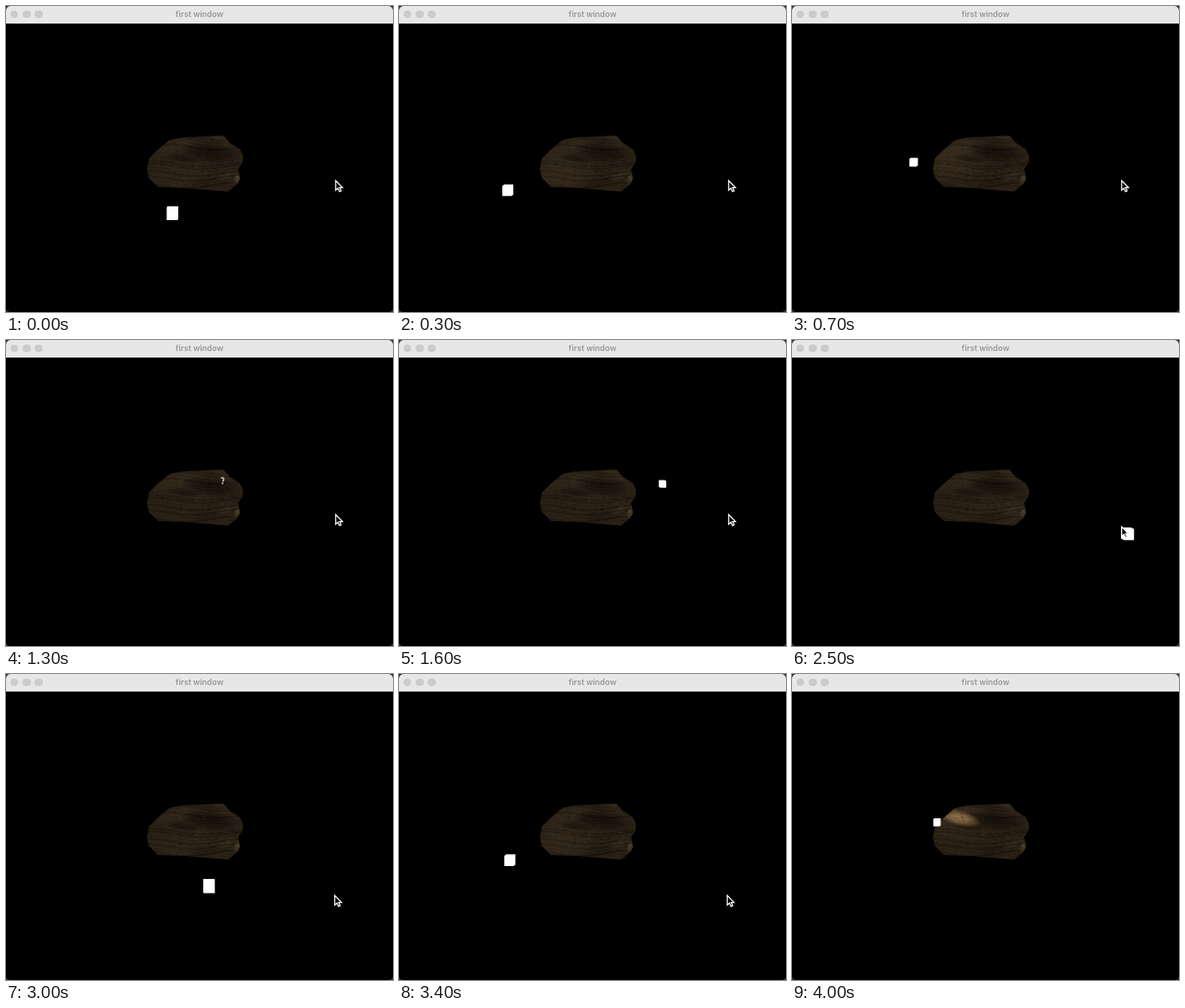
Write an HTML page with a canvas that moves like this. It is 420 by 333 pixels and loops after 4.1 s.

```html
<!DOCTYPE html>
<html lang="en">
<head>
<meta charset="utf-8">
<title>first window</title>
<style>
  html, body { margin: 0; width: 100%; height: 100%; overflow: hidden; background: #333; }
  .window { position: absolute; left: 0; top: 0; width: 420px; height: 333px; overflow: hidden; background: #000; border-radius: 5px; }
  .bar { position: absolute; left: 0; top: 0; width: 420px; height: 20px; background: #e7e7e7; border-bottom: 1px solid #1c2420; box-sizing: border-box; }
  .bar i { position: absolute; top: 4.7px; left: 4.8px; width: 8.6px; height: 8.6px; border-radius: 50%; background: #cbcbcb; }
  .bar i + i { left: 18px; }
  .bar i + i + i { left: 31.3px; }
  .bar span { position: absolute; left: 0; width: 420px; top: 0; text-align: center; font: 600 8.7px/18px Inter, sans-serif; color: #989898; }
  canvas { position: absolute; left: 0; top: 0; }
</style>
</head>
<body>
<div class="window">
  <canvas id="view" width="420" height="333"></canvas>
  <div class="bar"><i></i><i></i><i></i><span>first window</span></div>
</div>
<script>
const LOOP = 4.1, STEP = 0.1;
const ctx = document.getElementById('view').getContext('2d');
const { sin, cos, exp, abs, PI } = Math;
const rad = d => d * PI / 180;
const shape = s => new Path2D('M' + s + 'Z');
const brown = (v, alpha = 1) => `rgba(${v},${v * .78},${v * .53},${alpha})`;

function smooth(a, b, t) {
  const k = Math.min(1, Math.max(0, (t - a) / (b - a)));
  return k * k * (3 - 2 * k);
}

let seed = 7;
const rnd = () => (seed = seed * 16807 % 2147483647) / 2147483647;

// light angle in degrees: 0 = nearest the viewer, 90 = left, 180 = far side
const lightAngle = t => 24 + 116.5 * t + 3 * sin(2 * PI * t / LOOP);

const rock = shape('177 146L190 143 236 141 243 149 254 156 257 163 257 170 252 177 254 188 251 194 241 202 195 198 165 197 155 187 153 178 155 166 164 157');
const arrow = shape('0 0V10.4L2.4 8.2 4.1 12 5.9 11.2 4.3 7.6H7.4');

// wavy layers of stone running across the rock
const strata = Array.from({ length: 26 }, (_, i) => {
  const path = new Path2D(), y = 138 + i * 2.6;
  for (let x = 150; x <= 260; x += 5) path.lineTo(x, y + 3 * sin(x / 17 + i * .12));
  return { path, color: rnd() < .5 ? 'rgba(8,6,3,.22)' : 'rgba(100,78,48,.14)' };
});
const grain = Array.from({ length: 420 }, () => ({
  x: 152 + rnd() * 106, y: 140 + rnd() * 63, len: 1 + rnd() * 3,
  color: rnd() < .6 ? 'rgba(8,6,4,.22)' : 'rgba(110,86,58,.12)'
}));

// soft tilted spot of colour
function blob(x, y, rx, ry, tilt, v, alpha) {
  ctx.save();
  ctx.translate(x, y);
  ctx.rotate(rad(tilt));
  ctx.scale(rx, ry);
  const g = ctx.createRadialGradient(0, 0, 0, 0, 0, 1);
  g.addColorStop(0, brown(v, alpha));
  g.addColorStop(.5, brown(v, alpha * .7));
  g.addColorStop(1, brown(v, 0));
  ctx.fillStyle = g;
  ctx.fillRect(-1, -1, 2, 2);
  ctx.restore();
}

function drawRock(turn) {
  const s = sin(rad(turn)), c = cos(rad(turn));
  ctx.save();
  ctx.clip(rock);
  ctx.fillStyle = brown(38);
  ctx.fillRect(150, 138, 110, 66);

  blob(205 - 35 * s, 172 + 16 * c, 42, 26, 0, 66, .2 + .45 * Math.max(0, s) ** 4);
  blob(186, 153, 30, 9, -12, 56, .5);
  blob(236, 146, 18, 6, 30, 62, .45);
  blob(222, 160, 34, 12, 8, 12, .8);
  blob(192, 166, 20, 5, 8, 12, .6);
  blob(240, 184, 14, 5, -24, 62, .6);
  blob(251, 188, 4, 7, 10, 95, .7);
  blob(218, 193, 26, 8, -8, 20, .5);

  // glow while the light skims the upper left edge
  const glow = exp(-(((turn - 134) / 13) ** 2));
  blob(180, 156, 26, 9, 16, 165, .95 * glow);

  for (const l of strata) {
    ctx.strokeStyle = l.color;
    ctx.stroke(l.path);
  }
  for (const g of grain) {
    ctx.fillStyle = g.color;
    ctx.fillRect(g.x, g.y, g.len, 1);
  }
  ctx.restore();
}

function drawCube(turn) {
  const s = sin(rad(turn)), c = cos(rad(turn)), w = 1 / (1 - .33 * c);
  const x = 240.5 + (9 * c - 123 * s) * w, y = 179.8 + 35 * c * w;
  const fw = 8.3 * w, fh = 9.2 * w;
  const dx = (210 - x) * .022, dy = -1.3 * w;
  const l = x - (fw + dx) / 2, r = l + fw;
  const t = y - (fh + dy) / 2, b = t + fh;
  const [near, far] = dx >= 0 ? [l, r] : [r, l];

  // near face joined to the far face, which is shifted by dx, dy
  ctx.fillStyle = '#fff';
  ctx.beginPath();
  for (const p of [[near, b], [near, t], [near + dx, t + dy], [far + dx, t + dy], [far + dx, b + dy], [far, b]]) ctx.lineTo(...p);
  ctx.fill();
}

function drawSliver() {
  ctx.strokeStyle = '#e8e6e2';
  ctx.lineWidth = 1.2;
  ctx.stroke(new Path2D('M233 150H236V153L235 154M235 155V157'));
  ctx.lineWidth = 1;
}

function drawCursor(t) {
  if (t > 3.75) return;
  const leave = smooth(3.5, 3.9, t);
  ctx.save();
  ctx.translate(357.8 - 1.6 * smooth(2.4, 3.4, t) + 40 * leave, 190 + 51 * smooth(2.3, 2.9, t) + 75 * leave);
  ctx.fillStyle = '#000';
  ctx.strokeStyle = '#fff';
  ctx.lineWidth = 1.2;
  ctx.fill(arrow);
  ctx.stroke(arrow);
  ctx.restore();
}

function draw(t) {
  const turn = lightAngle(t) % 360;
  const behind = turn > 136 && turn < 224;
  ctx.fillStyle = '#000';
  ctx.fillRect(0, 0, 420, 333);
  if (behind) drawCube(turn);
  drawRock(turn);
  if (!behind) drawCube(turn);
  if (abs(turn - 180) < 6) drawSliver();
  drawCursor(t);
}

const start = performance.now();
function tick() {
  const t = (performance.now() - start) / 1000 % LOOP;
  draw(Math.floor(t / STEP + 1e-6) * STEP);
  requestAnimationFrame(tick);
}
tick();
</script>
</body>
</html>
```
